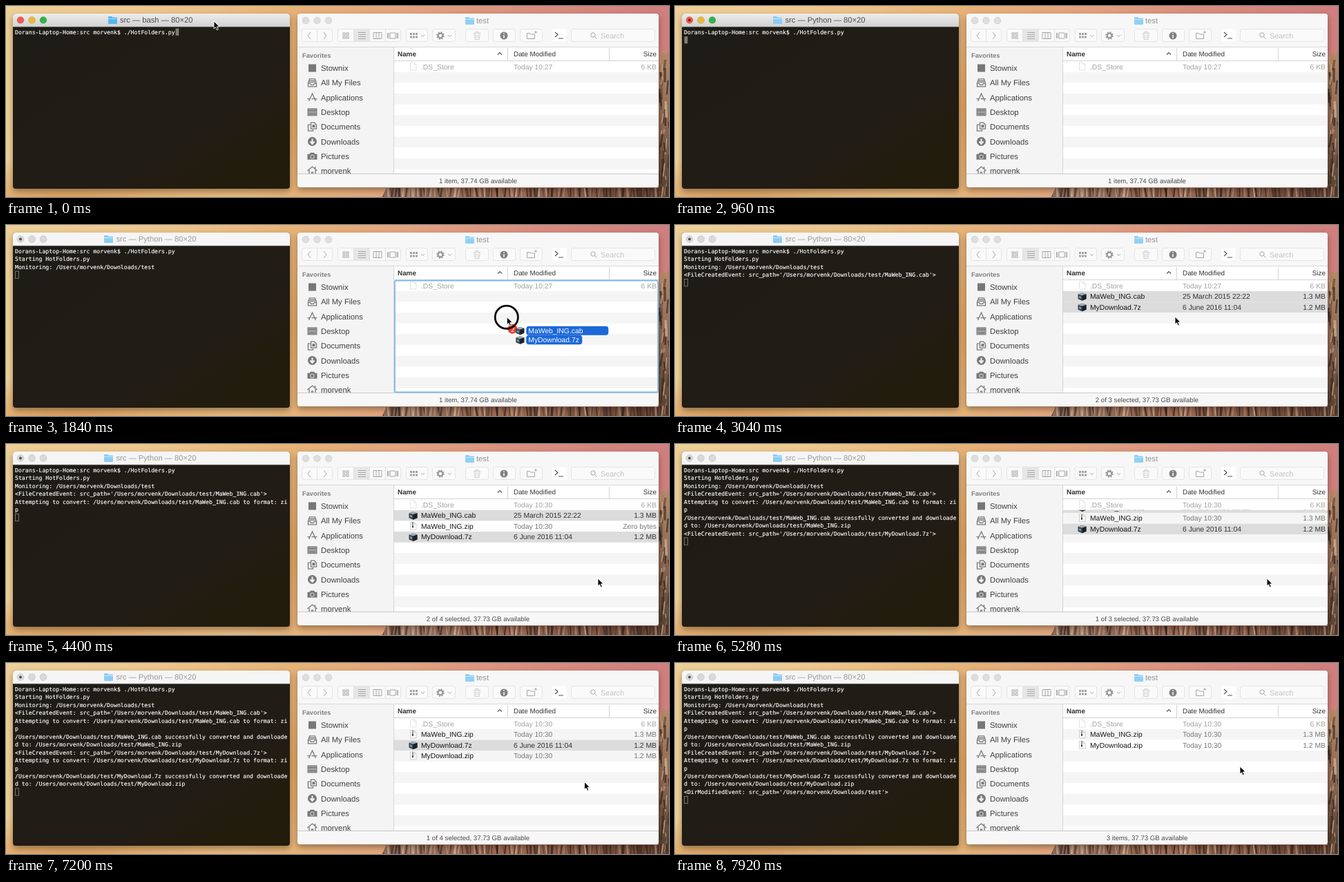
Write an HTML page that moves like this. It is 960x277 px and loops after 8 s.

```html
<!DOCTYPE html>
<html lang="en">
<head>
<meta charset="utf-8">
<title>Hot folders</title>
<style>
html, body { margin: 0; width: 100%; height: 100%; overflow: hidden; background: #efc795; }
svg { display: block; width: 960px; height: 277px; }
text { font-family: "Liberation Sans", Arial, sans-serif; text-rendering: geometricPrecision; white-space: pre; }
#log text { font: 8.2px "DejaVu Sans Mono", monospace; fill: #fff; stroke: #fff; stroke-width: .15; }
.title { font-size: 11.2px; }
.side { font-size: 11.3px; fill: #404040; }
.row { font-size: 10.35px; }
.head { font-size: 9.9px; fill: #333; }
.btn { fill: #fafafa; stroke: #e4e4e4; }
.ico { fill: none; stroke: #a6a6a6; stroke-width: 1; }
.glyph { fill: #777; }
.line { fill: none; stroke: #777; stroke-width: 1.3; }
</style>
</head>
<body>
<svg viewBox="0 0 960 277">
  <defs>
    <linearGradient id="sky">
      <stop offset="0" stop-color="#edcf98"/><stop offset=".2" stop-color="#efc88f"/>
      <stop offset=".43" stop-color="#e7b377"/><stop offset=".6" stop-color="#e4a47e"/>
      <stop offset=".8" stop-color="#d98d7e"/><stop offset="1" stop-color="#cf7f7d"/>
    </linearGradient>
    <radialGradient id="glow"><stop offset="0" stop-color="#dd9a55"/><stop offset="1" stop-color="#dd9a55" stop-opacity="0"/></radialGradient>
    <linearGradient id="rock" x2="0" y2="1">
      <stop offset="0" stop-color="#b98a68"/><stop offset=".5" stop-color="#8d6650"/><stop offset="1" stop-color="#55402f"/>
    </linearGradient>
    <linearGradient id="ridge">
      <stop offset="0" stop-color="#8d6a58"/><stop offset=".45" stop-color="#a06a52"/><stop offset="1" stop-color="#6c4836"/>
    </linearGradient>
    <linearGradient id="bar" x2="0" y2="1"><stop offset="0" stop-color="#ececec"/><stop offset="1" stop-color="#d2d2d2"/></linearGradient>
    <linearGradient id="term" x2="1" y2="1">
      <stop offset="0" stop-color="#1f1d17"/><stop offset=".5" stop-color="#201a13"/><stop offset="1" stop-color="#241a10"/>
    </linearGradient>
    <filter id="shade" x="-10%" y="-10%" width="120%" height="125%">
      <feDropShadow dx="0" dy="4" stdDeviation="5" flood-color="#000" flood-opacity=".36"/>
    </filter>
    <clipPath id="list"><rect x="562" y="80" width="383" height="163"/></clipPath>
    <clipPath id="sidebar"><rect x="422" y="59" width="139" height="184"/></clipPath>
    <clipPath id="hills"><path id="hill" d="M545 277l6-13h394V78l6-12 4 4 5-6v213z"/></clipPath>
    <g id="folder">
      <path d="M0 2q0-1 1-1h4l1.500 1.500H12q1 0 1 1V11q0 1-1 1H1q-1 0-1-1z"/>
      <path d="M0 4.500h13" stroke="#fff" stroke-opacity=".5"/>
    </g>
    <g id="page"><path d="M.5.5h5.500l3 3v8h-8.500z" fill="#fff" stroke="#c4c4c4" stroke-width=".8"/><path d="M6 .5v3h3" fill="none" stroke="#c4c4c4" stroke-width=".8"/></g>
    <g id="zip"><use href="#page"/><path d="M4 1v6" stroke="#555" stroke-width="1.700" stroke-dasharray="1.200 .5"/><path d="M3 6h2v2.500H3z" fill="#333"/></g>
    <g id="cube">
      <path d="M0 3l6-2 6 2v7l-6 2.500L0 10z" fill="#39424a"/>
      <path d="M0 3l6-2 6 2-6 2z" fill="#a3adb4"/><path d="M6 5l6-2v7l-6 2.500z" fill="#1b2228"/>
      <path d="M1.500 5.500l3 1v3l-3-1z" fill="#6f9dba"/>
    </g>
  </defs>

  <rect width="960" height="277" fill="url(#sky)"/>
  <ellipse cx="90" cy="290" rx="260" ry="70" fill="url(#glow)"/>
  <ellipse cx="416" cy="150" rx="60" ry="120" fill="url(#glow)" opacity=".6"/>
  <use href="#hill" fill="url(#rock)"/>
  <path d="M545 277l6-13h409v13z" fill="url(#ridge)"/>
  <g id="streaks" clip-path="url(#hills)"></g>

  <!-- terminal -->
  <g filter="url(#shade)"><rect x="10" y="11" width="401" height="254" rx="4" fill="url(#term)"/></g>
  <path id="tbar" d="M10 30V15q0-4 4-4h393q4 0 4 4v15z"/>
  <path d="M10 30h401" stroke="#b5b5b5" stroke-width=".7"/>
  <g id="lights"></g>
  <use id="tfolder" href="#folder" y="14"/>
  <text id="ttext" class="title" y="24.300"></text>
  <g id="log"></g>

  <!-- file browser -->
  <g filter="url(#shade)"><rect x="422" y="11" width="523" height="252" rx="4" fill="#f7f7f7"/></g>
  <g fill="#dedede" stroke="#cbcbcb" stroke-width=".7">
    <circle cx="434" cy="21" r="4.800"/><circle cx="450.500" cy="21" r="4.800"/><circle cx="467" cy="21" r="4.800"/>
  </g>
  <use href="#folder" x="665" y="15" fill="#8fd0f4"/>
  <text class="title" x="681" y="25" fill="#929292">test</text>
  <g id="tools"></g>
  <rect x="422" y="59" width="139" height="184" fill="#f4f4f4"/>
  <path d="M422 59.500h523" stroke="#d8d8d8"/>
  <g id="side" clip-path="url(#sidebar)"></g>
  <rect x="562" y="60" width="383" height="183" fill="#fff"/>
  <g clip-path="url(#list)"><g id="stripes" fill="#f5f5f5"></g><g id="rows"></g></g>
  <path d="M561.500 60v183M562 79.500h383M726.500 61v18M873.500 61v18" stroke="#d4d4d4" fill="none"/>
  <text class="head" x="567" y="72.500" font-weight="bold">Name</text>
  <path d="M712 70.500l3-3 3 3" fill="none" stroke="#555" stroke-width="1.200"/>
  <text class="head" x="735" y="72.500">Date Modified</text>
  <text class="head" x="942" y="72.500" text-anchor="end">Size</text>
  <path d="M422 243.500h523" stroke="#c9c9c9"/>
  <text id="status" x="683.500" y="256.700" font-size="9.640" text-anchor="middle" fill="#4a4a4a"></text>
  <rect id="drop" x="563" y="80.500" width="381" height="162" rx="2" fill="none" stroke="#86baec" stroke-width="1.800"/>

  <g id="pointer">
    <g id="drag">
      <circle cx="8" cy="17" r="7" fill="#ee3b2f"/>
      <text x="6" y="21" font-size="9" fill="#fff">2</text>
      <use href="#cube" x="13" y="13"/><use href="#cube" x="13" y="26.500"/>
      <rect x="28" y="13" width="119" height="13" rx="4" fill="#1c68d9"/>
      <rect x="28" y="26" width="81" height="13.500" rx="4" fill="#1c68d9"/>
      <text class="row" x="31" y="23.300" fill="#fff">MaWeb_ING.cab</text>
      <text class="row" x="31" y="36.500" fill="#fff">MyDownload.7z</text>
      <circle cx="-.5" cy="0" r="16.600" fill="none" stroke="#080808" stroke-width="2.800"/>
    </g>
    <path d="M0 0v11l2.500-2.300 1.800 4.100 2-.9-1.800-4H8z" fill="#000" stroke="#fff" stroke-width=".9"/>
  </g>
</svg>
<script>
const $ = id => document.getElementById(id);
const LOOP = 8000, STEP = 80, ROW = 15.65, TOP = 80;
const HOME = '/Users/morvenk/Downloads/test';
const ENTER = 720, BLUR = 1240, DROP = 1960;
const CAB_DONE = 5040, CAB_GONE = 5120, ZIP1 = 3480, ZIP2 = 5840, SECOND_DONE = 7200;

const esc = s => s.replace(/&/g, '&amp;').replace(/</g, '&lt;');
const last = (table, t) => table.filter(r => r[0] <= t).pop()[1];
const ease = p => { p = Math.min(1, Math.max(0, p)); return p * p * (3 - 2 * p); };
const created = f => `<FileCreatedEvent: src_path='${HOME}/${f}'>`;
const trying = f => `Attempting to convert: ${HOME}/${f} to format: zip`;
const success = (f, z) => `${HOME}/${f} successfully converted and downloaded to: ${HOME}/${z}`;

const log = [
  [0, 'Dorans-Laptop-Home:src morvenk$ ./HotFolders.py'],
  [1120, 'Starting HotFolders.py'],
  [1120, 'Monitoring: ' + HOME],
  [2400, created('MaWeb_ING.cab')],
  [3120, trying('MaWeb_ING.cab')],
  [CAB_DONE, success('MaWeb_ING.cab', 'MaWeb_ING.zip')],
  [5200, created('MyDownload.7z')],
  [5440, trying('MyDownload.7z')],
  [SECOND_DONE, success('MyDownload.7z', 'MyDownload.zip')],
  [7360, `<DirModifiedEvent: src_path='${HOME}'>`]
];
const status = [
  [0, '1 item, 37.74'], [DROP, '2 of 3 selected, 37.73'], [ZIP1, '2 of 4 selected, 37.73'],
  [CAB_GONE, '1 of 3 selected, 37.73'], [ZIP2, '1 of 4 selected, 37.73'], [SECOND_DONE + 80, '3 items, 37.73']
];
const files = [
  { name: '.DS_Store', icon: 'page', from: -999, to: 1e5, dim: 1, date: [[0, 'Today 10:27'], [ZIP1, 'Today 10:30']], size: [[0, '6 KB']] },
  { name: 'MaWeb_ING.cab', icon: 'cube', from: DROP, to: CAB_GONE, sel: 1, date: [[0, '25 March 2015 22:22']], size: [[0, '1.3 MB']] },
  { name: 'MaWeb_ING.zip', icon: 'zip', from: ZIP1, to: 1e5, date: [[0, 'Today 10:30']], size: [[0, 'Zero bytes'], [CAB_DONE, '1.3 MB']] },
  { name: 'MyDownload.7z', icon: 'cube', from: DROP, to: SECOND_DONE + 80, sel: 1, date: [[0, '6 June 2016 11:04']], size: [[0, '1.2 MB']] },
  { name: 'MyDownload.zip', icon: 'zip', from: ZIP2, to: 1e5, date: [[0, 'Today 10:30']], size: [[0, 'Zero bytes'], [SECOND_DONE, '1.2 MB']] }
];
const path = [
  [0, 301, 22], [ENTER, 301, 22], [1360, 727, 330], [1760, 726, 134], [1960, 724, 133],
  [3300, 724, 133], [3900, 857, 195], [6900, 857, 195], [7500, 818, 150], [LOOP, 818, 150]
];

// Seeded streaks give the cliffs their grain
function drawCliffs() {
  let seed = 7, s = '';
  const rnd = () => (seed = seed * 16807 % 2147483647) / 2147483647;
  const streak = (x, y, len, light) => {
    const c = rnd() < light ? '#dcc2a4' : '#35271f';
    s += `<path d="M${x} ${y}l${rnd() * 6 - 3} ${len}" stroke="${c}" stroke-width="${1 + rnd() * 2.500}" opacity="${.3 + rnd() * .5}"/>`;
  };
  for (let x = 547; x < 958; x += 4) streak(x + rnd() * 3, 262, 16, x < 690 ? .6 : .25);
  for (let y = 72; y < 262; y += 6) streak(946 + rnd() * 14, y, 10 + rnd() * 14, .4);
  $('streaks').innerHTML = s;
}

function drawTools() {
  const boxes = [[428, 44], [480, 91], [579, 31], [617, 33], [665, 33], [705, 32], [744, 32], [818, 121]];
  let s = boxes.map(([x, w]) => `<rect class="btn" x="${x + .5}" y="33.500" width="${w}" height="18" rx="3"/>`).join('');
  s += '<rect x="503" y="33.500" width="24" height="18" fill="#e6e6e6"/><rect x="791" y="33.500" width="21" height="18" rx="2" fill="#fff"/>';
  for (const x of [450, 503, 526, 549]) s += `<path d="M${x}.5 34v18" stroke="#e2e2e2"/>`;
  for (let i = 0; i < 4; i++) s += `<rect class="ico" x="${488 + i % 2 * 5}" y="${39 + (i >> 1) * 5}" width="3" height="3"/>`;
  for (let i = 0; i < 6; i++) s += `<rect x="${585 + i % 3 * 4}" y="${39 + (i > 2) * 4.5}" width="3" height="3" fill="#a3a3a3"/>`;
  s += `<path class="ico" d="M441 38l-4 5 4 5M460 38l4 5-4 5M510 38.500h11M510 41.500h11M510 44.500h11M510 47.500h11
    M532 38.500h12v9h-12zM536 38.500v9M540 38.500v9M556 39h8v8h-8zM554 39v8M566 39v8M552.500 39v8M567.500 39v8
    M601 42l2.500 2.500 2.500-2.500M640 42l2.500 2.500 2.500-2.500"/>`;
  s += '<circle cx="629" cy="43" r="3.400" fill="none" stroke="#9b9b9b" stroke-width="2.400"/><circle cx="629" cy="43" r="5" fill="none" stroke="#9b9b9b" stroke-width="1.600" stroke-dasharray="2 1.930"/>';
  s += '<path class="ico" style="stroke:#cfcfcf" d="M677 39.500h10M680 39v-1.500h4V39M678 40l.8 8.500h6.400L686 40M680.500 41v6M683.500 41v6"/>';
  s += '<circle cx="721" cy="43" r="5.500" fill="#808080"/><path d="M721 39v1.500M721 42v4.500" stroke="#fff" stroke-width="1.500"/>';
  s += '<path class="ico" d="M754.500 39.500h4l1 1.500h6v6.500h-11zM767 36v4M765 38h4"/>';
  s += '<path d="M795 38l4 3.500-4 3.500M800 47h7" fill="none" stroke="#555" stroke-width="1.200"/>';
  s += '<circle class="ico" cx="850" cy="42" r="3.200"/><path class="ico" d="M852.500 44.500l3 3"/>';
  $('tools').innerHTML = s + '<text x="861" y="46.800" font-size="10.800" fill="#c2c2c2">Search</text>';
}

// Icons are centred on 0,0
const places = [
  ['Stownix', '<rect class="glyph" x="-5.500" y="-5.500" width="11" height="11"/>'],
  ['All My Files', '<path class="line" d="M-4-5.500h8l2 6v5H-6v-5zM-6 1h3l1 2h4l1-2h3M-4-3h8M-4.500-1h9"/>'],
  ['Applications', '<path class="line" d="M-5 5.500L0-5.500 5 5.500M-7 2h4M-1 2h8"/>'],
  ['Desktop', '<rect x="-6.500" y="-5" width="13" height="10" fill="#a0a0a0" stroke="#777"/><path d="M-6-2.500H6M-5 2.500H5" stroke="#777" stroke-width="1.500"/>'],
  ['Documents', '<path class="line" d="M-2-6h5l3 3v6h-8zM-3-3h-3v9h7V4"/><path class="glyph" d="M0-3h4v4H0z"/>'],
  ['Downloads', '<circle class="glyph" r="6.500"/><path d="M0-4v6M-3 0l3 3.500L3 0" fill="none" stroke="#f3f3f3" stroke-width="2"/>'],
  ['Pictures', '<path class="glyph" d="M-7-3h3l1.500-2h5L4-3h3v8H-7z"/><circle cy="1" r="2.700" fill="none" stroke="#c4c4c4" stroke-width="1.200"/>'],
  ['morvenk', '<path class="line" d="M-7 0l7-6 7 6M-4.500-1v7H-1V2h2v4h3.500v-7M4-6v3"/>']
];

function drawSide() {
  $('side').innerHTML = '<text x="429" y="74.700" font-size="9.300" font-weight="bold" fill="#808080">Favorites</text>' +
    places.map(([name, icon], i) => {
      const y = 90 + i * 21.3;
      return `<g transform="translate(443.500 ${y})">${icon}</g><text class="side" x="456" y="${y + 4}">${name}</text>`;
    }).join('');
  for (let i = 1; i < 11; i += 2)
    $('stripes').innerHTML += `<rect x="562" y="${TOP + i * ROW}" width="383" height="${ROW}"/>`;
}

function drawTerminal(t) {
  const active = t < BLUR, running = t >= ENTER;
  $('tbar').setAttribute('fill', active ? 'url(#bar)' : '#f5f5f5');
  const fills = active ? ['#f25a4d', '#e9b93a', '#34b348'] : ['#d9d9d9', '#d9d9d9', '#d9d9d9'];
  $('lights').innerHTML = fills.map((c, i) =>
    `<circle cx="${21 + i * 16.5}" cy="20.500" r="5" fill="${c}" stroke="#000" stroke-opacity=".14" stroke-width=".7"/>`).join('') +
    (running ? `<circle cx="21" cy="20.500" r="1.900" fill="${active ? '#8a1a14' : '#4c4c4c'}"/>` : '');
  $('tfolder').setAttribute('x', running ? 142 : 148);
  $('tfolder').setAttribute('fill', running ? '#8ccdf3' : '#57b6ee');
  $('ttext').setAttribute('x', running ? 159.5 : 165);
  $('ttext').setAttribute('fill', active ? '#4c4c4c' : '#999');
  $('ttext').textContent = `src — ${running ? 'Python' : 'bash'} — 80×20`;

  const lines = log.filter(r => r[0] <= t).flatMap(r => r[1].match(/.{1,80}/g));
  const col = running ? 0 : lines[0].length, n = running ? lines.length : 0;
  const look = active ? 'fill="#7d7b76"' : 'fill="none" stroke="#8b8984" stroke-width=".8"';
  $('log').innerHTML = lines.map((s, i) => `<text x="13" y="${40.700 + i * 11.48}">${esc(s)}</text>`).join('') +
    `<rect x="${13.5 + col * 4.937}" y="${32.6 + n * 11.48}" width="4.800" height="10.300" ${look}/>`;
}

function drawRows(t) {
  let at = 0;
  const parts = files.map(f => {
    const p = t < f.to ? ease((t - f.from) / 160) : 1 - ease((t - f.to) / 240);
    const y = TOP + (at - 1 + p) * ROW;
    const bg = f.sel ? '#dcdcdc' : Math.round(at) % 2 ? '#f5f5f5' : '#fff';
    at += p;
    if (!p) return '';
    const ink = f.dim ? '#a3a3a3' : '#151515', soft = f.dim ? '#a3a3a3' : f.sel ? '#333' : '#777';
    const txt = (x, c, s, more = '') => `<text class="row" x="${x}" y="11.500" fill="${c}" ${more}>${s}</text>`;
    return `<g transform="translate(0 ${y})"><rect x="562" width="383" height="${ROW + .1}" fill="${bg}"/>` +
      `<use href="#${f.icon}" x="${f.icon === 'cube' ? 583.5 : 585}" y="1.500"${f.dim ? ' opacity=".6"' : ''}/>` +
      txt(601, ink, f.name) + txt(735, soft, last(f.date, t)) +
      txt(942, soft, last(f.size, t), 'text-anchor="end"') + '</g>';
  });
  $('rows').innerHTML = parts.reverse().join('');
  $('status').textContent = last(status, t) + ' GB available';
}

function drawPointer(t) {
  const i = Math.max(1, path.findIndex(k => k[0] > t));
  const [t0, x0, y0] = path[i - 1], [t1, x1, y1] = path[i];
  const p = ease((t - t0) / (t1 - t0));
  $('pointer').setAttribute('transform', `translate(${x0 + (x1 - x0) * p} ${y0 + (y1 - y0) * p})`);
  const show = (id, on) => $(id).setAttribute('visibility', on ? 'visible' : 'hidden');
  show('pointer', t < ENTER || t >= 1360);
  show('drag', t >= 1360 && t < 1920);
  show('drop', t >= 1520 && t < 1920);
}

let shown = -1;
function tick() {
  const t = Math.floor(performance.now() % LOOP / STEP) * STEP;
  if (t !== shown) {
    shown = t;
    drawTerminal(t);
    drawRows(t);
    drawPointer(t);
  }
  requestAnimationFrame(tick);
}
drawCliffs();
drawTools();
drawSide();
tick();
</script>
</body>
</html>
```
